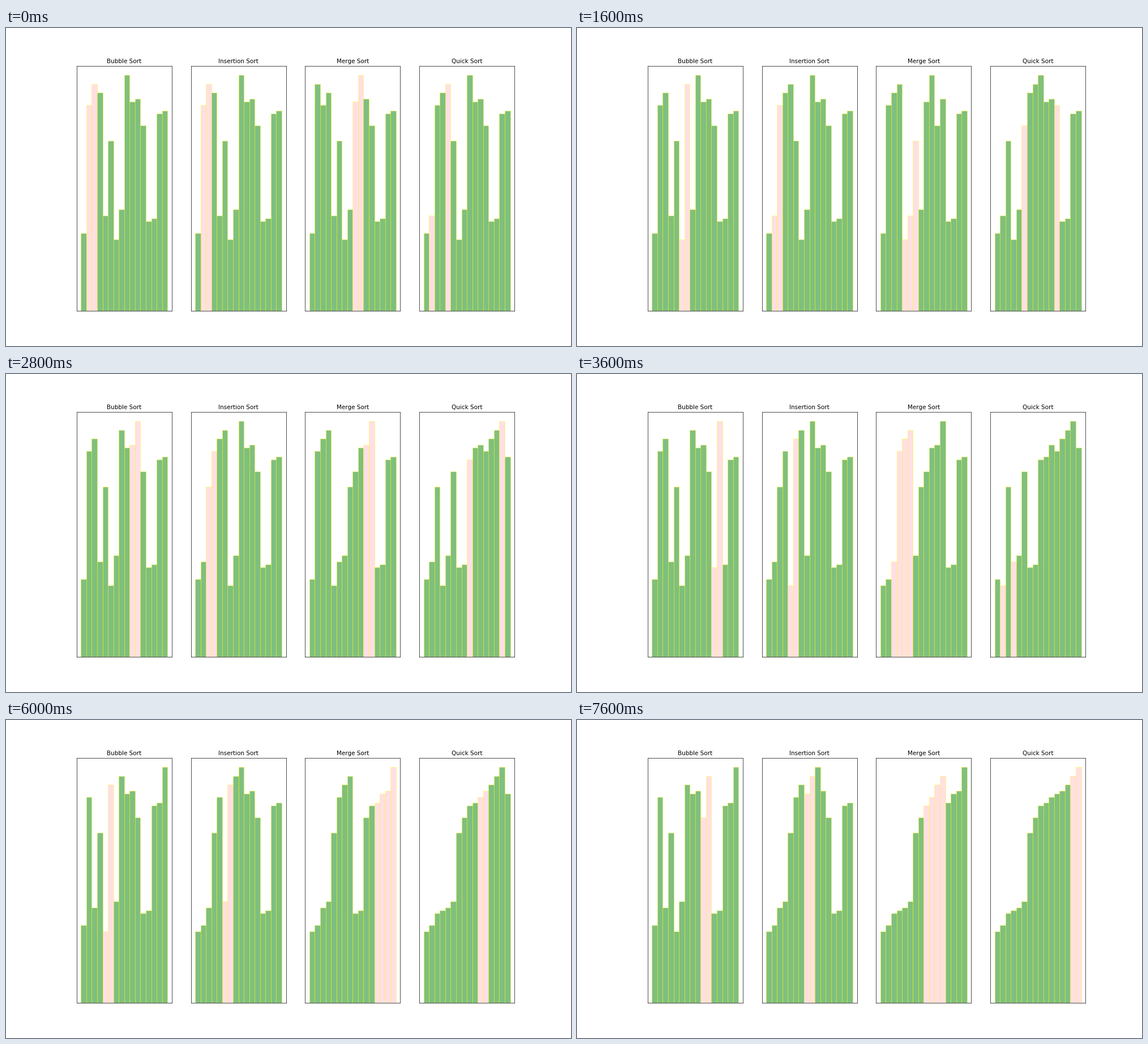
Write a matplotlib script that moves like this. It is 998x561 px and loops after 8000 ms.

```python
from itertools import islice

import matplotlib.pyplot as plt
from matplotlib.animation import FuncAnimation

VALUES = [26, 76, 69, 73, 32, 57, 24, 34, 79, 70, 71, 62, 30, 31, 66, 67]
STEPS = 20
STEP_MS = 400


def swap(a, i, j):
    a[i], a[j] = a[j], a[i]
    return a[:], {i, j}


def bubble_sort(a):
    for end in range(len(a) - 1, 0, -1):
        for j in range(end):
            if a[j] > a[j + 1]:
                yield swap(a, j, j + 1)


def insertion_sort(a):
    for i in range(1, len(a)):
        j = i
        while j > 0 and a[j - 1] > a[j]:
            yield swap(a, j - 1, j)
            j -= 1


def merge_sort(a):
    """Bottom-up, in place: smaller right-hand items are moved into the left run."""
    width = 1
    while width < len(a):
        for start in range(0, len(a), 2 * width):
            left, right = start, start + width
            end = min(start + 2 * width, len(a))
            while left < right < end:
                if a[right] < a[left]:
                    a.insert(left, a.pop(right))
                    yield a[:], set(range(left, right + 1))
                    right += 1
                left += 1
        width *= 2


def quick_sort(a, low=0, high=None):
    """Last item as pivot; only swaps that move something are shown."""
    if high is None:
        high = len(a) - 1
    if low >= high:
        return
    pivot, split = a[high], low
    for j in range(low, high + 1):
        if a[j] <= pivot:
            if j != split:
                yield swap(a, split, j)
            split += 1
    yield from quick_sort(a, low, split - 2)
    yield from quick_sort(a, split, high)


SORTS = {
    "Bubble Sort": bubble_sort,
    "Insertion Sort": insertion_sort,
    "Merge Sort": merge_sort,
    "Quick Sort": quick_sort,
}

plt.rcParams["font.family"] = "DejaVu Sans"
fig, axes = plt.subplots(1, len(SORTS), figsize=(16, 9), dpi=62.375)

panels = []
for ax, (title, sort) in zip(axes, SORTS.items()):
    ax.set_title(title)
    bars = ax.bar(range(len(VALUES)), VALUES, width=1, align="edge",
                  color="green", edgecolor="yellow", alpha=0.5)
    ax.set_xlim(-0.05 * len(VALUES), 1.05 * len(VALUES))
    ax.set_ylim(0, int(1.05 * max(VALUES)))
    ax.set_xticks([])
    ax.set_yticks([])
    panels.append((bars, list(islice(sort(VALUES[:]), STEPS))))


def draw(step):
    artists = []
    for bars, history in panels:
        heights, active = history[min(step, len(history) - 1)]
        for i, (bar, height) in enumerate(zip(bars, heights)):
            bar.set_height(height)
            bar.set_facecolor("pink" if i in active else "green")
            artists.append(bar)
    return artists


anim = FuncAnimation(fig, draw, frames=STEPS, interval=STEP_MS,
                     repeat=True, repeat_delay=0, blit=False)
plt.show()
```
